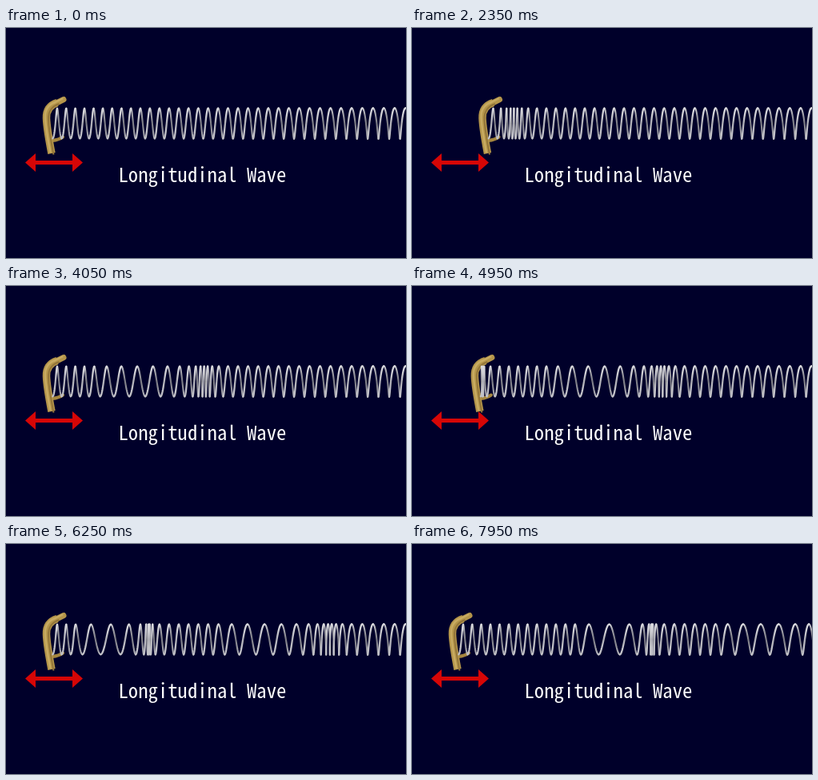
An HTML page with a canvas that plays this animation: 500x288 px, repeating every 8000 ms.

```html
<!DOCTYPE html>
<html lang="en">
<head>
<meta charset="utf-8">
<title>Longitudinal Wave</title>
<style>
  html, body { margin: 0; width: 100%; height: 100%; overflow: hidden; background: #00002a; }
  canvas { display: block; width: 500px; height: 288px; }
</style>
</head>
<body>
<canvas id="stage" width="500" height="288"></canvas>
<script>
const ctx = document.getElementById('stage').getContext('2d');
const LOOP = 8000, STEP = 50;
const SPEED = 0.0713;    // px per ms along the spring
const HAND_LEAD = 110;   // ms the hand moves ahead of the first coil
const COILS = 38, TURN = 2 * Math.PI;

const pulses = [
  { from: 1100, peak: 2360, to: 3520, height: 37.5 },
  { from: 4450, peak: 5330, to: 5980, height: 35.5 }
];

const clamp = u => Math.max(0, Math.min(1, u));
const ease = u => (1 - Math.cos(Math.PI * clamp(u))) / 2;

// Push and pull back; a lead starts the push earlier and the return later.
function push(t, lead = 0) {
  return pulses.reduce((sum, { from, peak, to, height }) => sum + height
    * ease((t + lead - from) / (peak - from))
    * (1 - ease((t - lead - peak) / (to - peak))), 0);
}

function shade(...colors) {
  const g = ctx.createLinearGradient(0, 99, 0, 140);
  colors.forEach((c, i) => g.addColorStop(i / (colors.length - 1), c));
  return g;
}
const backWire = shade('#d2d2d6', '#9c9ca3', '#7c7c84', '#96969d', '#bcbcc2');
const frontWire = shade('#dcdce0', '#ceced3', '#aeaeb5', '#c2c2c8', '#c2c2c7');

function stroke(path, color, width, cap = 'round') {
  ctx.strokeStyle = color;
  ctx.lineWidth = width;
  ctx.lineCap = cap;
  ctx.stroke(path);
}

const arm = new Path2D('M64 93.5 Q50 98 50.5 113 Q51 126 57 157');
const finger = new Path2D('M72 89.5 L61 95');
const thumb = new Path2D('M58 141 Q66 140 71 136.5');

function drawHand(shift) {
  ctx.save();
  ctx.translate(shift, 0);
  stroke(thumb, '#a5863f', 4);
  stroke(arm, '#b4954a', 9.5, 'butt');
  stroke(finger, '#b4954a', 7);
  ctx.translate(2.5, 1.5);
  stroke(arm, '#94763a', 2, 'butt');
  ctx.translate(-4, -2.5);
  stroke(arm, '#c8ab62', 2.5, 'butt');
  stroke(finger, '#c8ab62', 2.5);
  ctx.restore();
}

// Coil tops lie on whole numbers of s; perspective widens the pitch to the right.
function coilPoint(s, t, handShift) {
  const rest = 11.25 * s + 0.034 * s * s;
  const wave = push(t - rest / SPEED);
  const grip = clamp(0.5 - s / 2);
  const bulge = -0.6 + 0.058 * s;
  return [
    64 + rest + wave + (handShift - wave) * grip + bulge * Math.sin(TURN * s),
    119.5 - (18.7 + 0.015 * s) * Math.cos(TURN * s)
  ];
}

function halfTurn(start, t, handShift) {
  const path = new Path2D();
  for (let i = 0; i <= 16; i++) path.lineTo(...coilPoint(start + i / 32, t, handShift));
  return path;
}

function drawSpring(t, handShift) {
  for (let k = 0; k < COILS; k++) stroke(halfTurn(k, t, handShift), backWire, 2.1);
  for (let k = 0; k < COILS; k++) stroke(halfTurn(k - 0.5, t, handShift), frontWire, 2.3);
}

const arrow = new Path2D(
  'M24 168.5 L37 157 V166 H83 V157 L96 168.5 L83 180 V171 H37 V180 Z');

function draw(t) {
  const handShift = push(t, HAND_LEAD);
  ctx.fillStyle = '#00002a';
  ctx.fillRect(0, 0, 500, 288);
  drawHand(handShift);
  drawSpring(t, handShift);
  ctx.fillStyle = '#d60606';
  ctx.fill(arrow);
  ctx.fillStyle = '#fff';
  ctx.font = '24.7px "Noto Sans Mono CJK JP", "Noto Sans Mono CJK SC", "Noto Sans CJK JP", monospace';
  ctx.fillText('Longitudinal Wave', 140.5, 193);
}

ctx.lineJoin = 'round';
const start = performance.now();
function tick() {
  const t = (performance.now() - start) % LOOP;
  draw(Math.floor(t / STEP) * STEP);
  requestAnimationFrame(tick);
}
tick();
</script>
</body>
</html>
```
